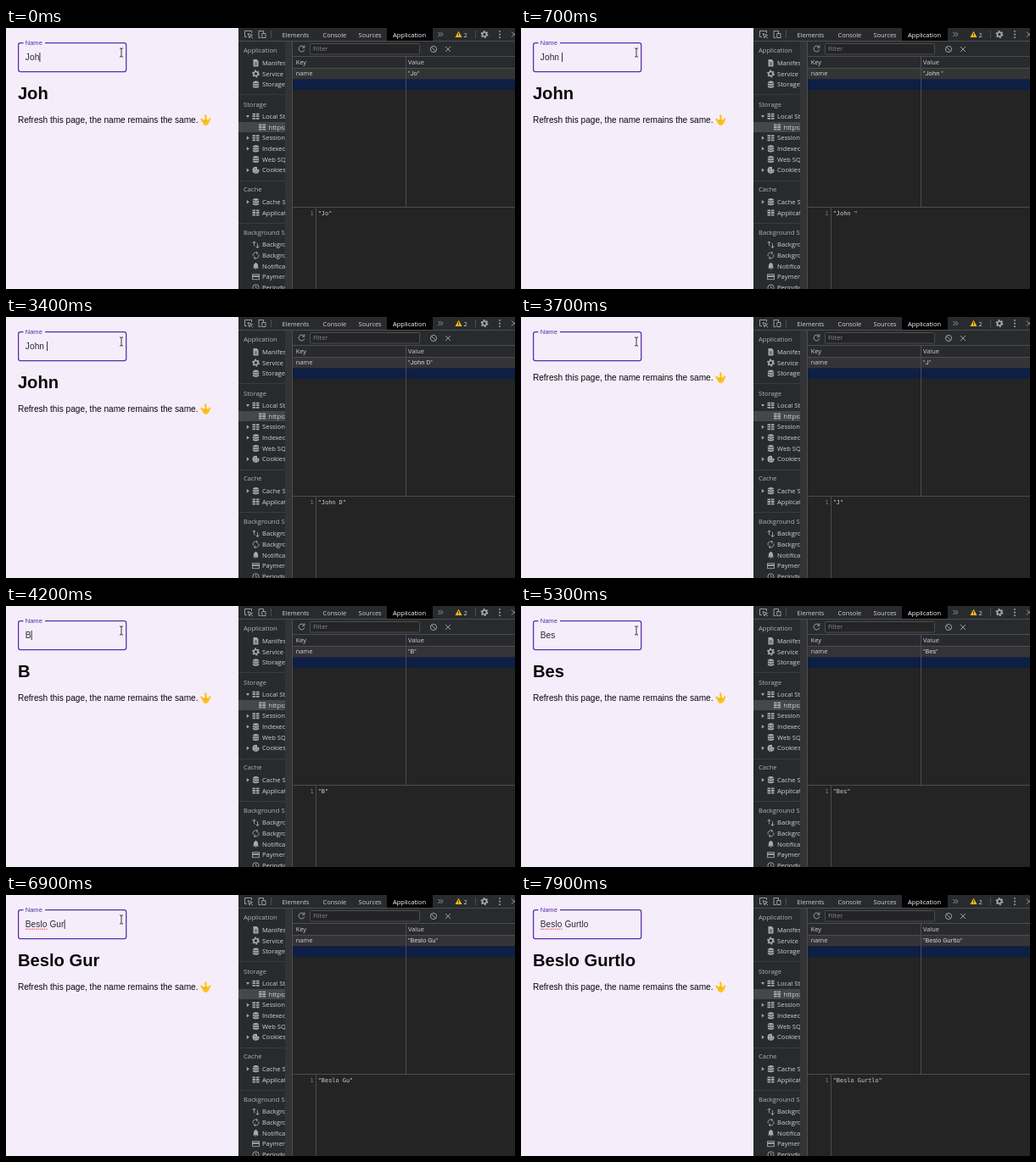
An HTML page for the animation above (8 s loop, 600 px wide and 308 px high).

```html
<!DOCTYPE html>
<html lang="en">
<head>
<meta charset="utf-8">
<title>Stored name demo</title>
<style>
  html, body { margin: 0; width: 100%; height: 100%; overflow: hidden; background: #f5edfa; }
  svg { display: block; }
  text { white-space: pre; }
  .page { font-family: "Liberation Sans", Arial, sans-serif; }
  .tools { font: 7.4px "Open Sans", "Noto Sans", sans-serif; fill: #d0d3d6; }
  .mono { font: 6.9px "DejaVu Sans Mono", monospace; }
  .value { font: 7.6px Roboto, sans-serif; }
  .line { fill: none; stroke: #a6aaae; stroke-width: .9; }
  .thick { stroke-width: 1.7; }
  .rule { fill: none; stroke: #4b4d50; stroke-width: 1; }
</style>
</head>
<body>
<svg width="600" height="308" viewBox="0 0 600 308">
  <defs><clipPath id="sideClip"><rect x="274" y="16" width="55" height="292"/></clipPath></defs>

  <g class="page">
    <rect width="275" height="308" fill="#f5edfa"/>
    <path d="M20.5 17.5H17Q14.6 17.5 14.6 19.9V49.2Q14.6 51.6 17 51.6H139.3Q141.7 51.6 141.7 49.2V19.9Q141.7 17.5 139.3 17.5H46"
      fill="none" stroke="#5a2ca8" stroke-width="1.25"/>
    <text x="22.7" y="19.7" font-size="7.57" fill="#5a2ca8">Name</text>
    <text id="field" x="22.8" y="38" font-size="10.1" letter-spacing=".095" fill="#2b292d"></text>
    <path id="misspelt" d="M23 40.2H48.5" stroke="#e04a4a" stroke-width="1" stroke-dasharray="1.6 .8"/>
    <rect id="caret" y="29" width=".9" height="11" fill="#222"/>
    <text id="heading" x="13.9" y="84" font-size="20.2" font-weight="bold" fill="#0a090b"></text>
    <g id="note">
      <text x="13.9" y="112.2" font-size="10.1" fill="#0a090b">Refresh this page, the name remains the same.</text>
      <g stroke="#fcc21b" stroke-width="2.2" stroke-linecap="round" fill="none">
        <path d="M232.6 110.8L230.4 107.6M235.8 109L235.2 103.3M238 112L240.2 107.4"/>
        <path d="M232.2 109.4Q235.5 107.4 238.2 109.6L237.6 113.2Q235 115.4 232.9 112.8Z" fill="#fcc21b" stroke-width="1.4"/>
      </g>
      <path d="M233 110.4Q235 109.1 237 110.6" fill="none" stroke="#e0a010" stroke-width=".6"/>
    </g>
    <path id="pointer" d="M-2 -5.2Q0 -5.2 0 -4Q0 -5.2 2 -5.2M0 -4.4V4.4M-2 5.2Q0 5.2 0 4Q0 5.2 2 5.2"
      fill="none" stroke="#2b292d" stroke-width=".9"/>
  </g>

  <g class="tools">
    <rect x="274" width="326" height="308" fill="#292a2d"/>
    <rect x="338" y="34" width="262" height="274" fill="#242424"/>
    <rect x="449" width="54" height="15" fill="#000"/>
    <path class="rule" d="M274 15.5H600M312.5 3V12"/>
    <path class="line" d="M284 10.5H281.5V3.5H289.5V6M285 6.5L290.5 8.5L288 9.3L287 11.8ZM288 9.3L291 12.2M300.5 11.5H298V3.5H303.5V6M301.8 6.5H306V11.5H301.8Z"/>
    <text x="325.5" y="10.5">Elements</text>
    <text x="373.5" y="10.5">Console</text>
    <text x="415.5" y="10.5">Sources</text>
    <text x="456" y="10.5" fill="#fff" font-size="7.5">Application</text>
    <path class="line" d="M509.5 5L512 7.5L509.5 10M512.5 5L515 7.5L512.5 10"/>
    <path d="M533.5 3.8L537.5 11H529.5Z" fill="#f5bd18"/>
    <path d="M533.5 6V8.6M533.5 9.4V10.2" stroke="#292a2d" stroke-width=".9"/>
    <text x="539.5" y="10.5">2</text>
    <path class="rule" d="M553.5 3V12"/>
    <g id="settings" transform="translate(564 7.5)"></g>
    <path d="M581.2 3.2h1.6v1.6h-1.6zM581.2 6.8h1.6v1.6h-1.6zM581.2 10.4h1.6v1.6h-1.6z" fill="#b0b4b8"/>
    <path class="line" d="M596 4.5L602 10.5M596 10.5L602 4.5"/>

    <g id="sidebar" clip-path="url(#sideClip)"></g>
    <rect x="329" y="16" width="8" height="292" fill="#333436"/>
    <path class="rule" d="M337.5 16V308"/>

    <path class="line" d="M351 22.2A3.4 3.4 0 1 0 351.8 25.5M351.8 20.5V23.2H349"/>
    <rect class="rule" x="358.5" y="18.5" width="129" height="12.5" rx="1" style="fill:#242424"/>
    <text x="362" y="27.2" fill="#85898d">Filter</text>
    <path class="line" d="M501.5 22.5L506.5 27.5M518 22L524 28M524 22L518 28"/>
    <circle class="line" cx="504" cy="25" r="3.6"/>

    <rect x="338" y="34" width="262" height="13" fill="#292a2d"/>
    <rect x="338" y="47.5" width="262" height="13" fill="#343436"/>
    <rect x="338" y="60.5" width="262" height="12.5" fill="#0e1e44"/>
    <path class="rule" d="M338 33.5H600M338 47.5H600M338 211.5H600M471.5 34V211M365.5 212V308"/>
    <text x="341.7" y="43.2">Key</text>
    <text x="474" y="43.2">Value</text>
    <text x="341.7" y="56">name</text>
    <text id="cell" class="value" x="474" y="56"></text>
    <text class="mono" x="358.5" y="221" fill="#7d8083">1</text>
    <text id="preview" class="mono" x="367.7" y="221"></text>
  </g>
</svg>

<script>
const LOOP = 8000;
const SECOND_NAME_AT = 3900;
const FIRST = "John Doe", SECOND = "Beslo Gurtlo";

// [time, letters in the field, letters stored]
const STEPS = [
  [0, 3, 2], [100, 3, 3], [300, 4, 4], [600, 5, 4], [700, 5, 5], [1000, 6, 5], [1100, 6, 6],
  [1300, 7, 6], [1400, 7, 7], [1600, 8, 7], [1700, 8, 8], [2800, 7, 8], [2900, 7, 7],
  [3100, 6, 6], [3400, 5, 6], [3500, 3, 5], [3600, 1, 3], [3700, 0, 1], [3800, 0, 0],
  [4100, 1, 0], [4200, 1, 1], [4400, 2, 1], [4500, 2, 2], [4700, 3, 3], [5400, 5, 4],
  [5500, 5, 5], [5800, 6, 5], [5900, 6, 6], [6100, 7, 7], [6300, 8, 7], [6400, 8, 8],
  [6900, 9, 8], [7000, 10, 9], [7100, 11, 10], [7200, 12, 11], [7300, 12, 12]
];
const CARET_OFF = [[2200, 2800], [3700, 4000], [5300, 5400], [7800, LOOP]];
const POINTER_MOVES_AT = 7800, POINTER_LEAVES_AT = 7900;

const el = id => document.getElementById(id);
const show = (id, on) => el(id).setAttribute("visibility", on ? "visible" : "hidden");

const stroke = d => `<path class="line" d="${d}"/>`;
const solid = d => `<path d="${d}" fill="#a6aaae"/>`;
const ICONS = {
  doc: solid("M-3-4.2H1L3-2.2V4.2H-3Z") + '<path d="M-1.5 0H1.5M-1.5 2H1.5" stroke="#292a2d" stroke-width=".8"/>',
  gear: '<circle class="line thick" r="2.5"/><circle class="line thick" r="3.6" stroke-dasharray="1.9 1.87"/>',
  db: solid("M-3.6-2.8Q0-5.4 3.6-2.8V3Q0 5.2-3.6 3Z") +
    '<path d="M-3.6-1.8Q0 0 3.6-1.8M-3.6 1Q0 2.8 3.6 1" fill="none" stroke="#292a2d" stroke-width=".8"/>',
  grid: [-3.5, -.9, 1.7].map(y => solid(`M-4 ${y}h3.6v1.8h-3.6zM.4 ${y}h3.6v1.8h-3.6z`)).join(""),
  cookie: '<circle r="4" fill="#a6aaae"/><path d="M-1.5-1.5h1v1h-1zM1 .8h1v1h-1zM-1.6 1.5h1v1h-1zM1.5-4h3v3h-3z" fill="#292a2d"/>',
  arrows: stroke("M-2 1.5V-3.8M-4-1.8L-2-3.8L0-1.8M2-1.5V3.8M0 1.8L2 3.8L4 1.8"),
  sync: stroke("M-3.3 1A3.4 3.4 0 0 1 2-2.8M3.3-1A3.4 3.4 0 0 1-2 2.8M.5-4.4L2.3-2.8L.5-1.2M-.5 4.4L-2.3 2.8L-.5 1.2"),
  bell: solid("M-3.6 2.6L-2.6 1.4V-1Q-2.4-3 0-4.2Q2.4-3 2.6-1V1.4L3.6 2.6ZM-1 3.2H1L0 4.3Z"),
  card: '<rect class="line" x="-3.9" y="-3" width="7.8" height="6"/>' + solid("M-4-1.6H4V.2H-4Z"),
  clock: '<circle class="line" r="3.6"/>' + stroke("M0-2V0L1.6 1")
};
const OPEN = "M283-1.2H287L285 1.8Z", CLOSED = "M283.8-2.2L286.8 0L283.8 2.2Z";

// [centre y, icon, label, arrow, indent]
const ROWS = [
  [41.2, "doc", "Manifest"], [54, "gear", "Service Workers"], [66.7, "db", "Storage"],
  [104.2, "grid", "Local Storage", OPEN], [117, "grid", "https://", "", 7.5],
  [129.7, "grid", "Session Storage", CLOSED], [142.4, "db", "IndexedDB", CLOSED],
  [155, "db", "Web SQL"], [167.7, "cookie", "Cookies", CLOSED],
  [205.2, "db", "Cache Storage", CLOSED], [218, "grid", "Application Cache"],
  [255.7, "arrows", "Background Fetch"], [268.4, "sync", "Background Sync"],
  [281, "bell", "Notifications"], [293.7, "card", "Payment Handler"], [306.4, "clock", "Periodic Sync"]
];
const SECTIONS = [[26.8, "Application"], [90, "Storage"], [190.8, "Cache"], [241.2, "Background Services"]];

function buildSidebar() {
  const rows = ROWS.map(([y, icon, label, arrow = "", indent = 0]) =>
    `<g transform="translate(0 ${y})">${arrow && solid(arrow)}
      <g transform="translate(${294.5 + indent} 0)">${ICONS[icon]}</g>
      <text x="${302 + indent}" y="2.6" font-size="7.6">${label}</text></g>`);
  const titles = SECTIONS.map(([y, label]) =>
    `<text x="280" y="${y + 2.6}" fill="#b0b4b8" font-size="7.6">${label}</text>`);
  const rules = [78.5, 180.5, 230.5].map(y => `<path d="M274 ${y}H330" stroke="#3a3b3e"/>`);
  el("sidebar").innerHTML =
    '<rect x="274" y="111" width="56" height="12" fill="#464749"/>' +
    [...rules, ...titles, ...rows].join("");
}

function render(time) {
  const [, typed, stored] = STEPS.findLast(step => step[0] <= time);
  const name = time < SECOND_NAME_AT ? FIRST : SECOND;
  const value = `"${name.slice(0, stored)}"`;
  const field = el("field");

  field.textContent = el("heading").textContent = name.slice(0, typed);
  el("cell").textContent = el("preview").textContent = value;
  el("note").setAttribute("transform", `translate(0 ${typed ? 0 : -37})`);

  el("caret").setAttribute("x", 22.9 + (typed ? field.getComputedTextLength() : 0));
  show("caret", !CARET_OFF.some(([from, to]) => time >= from && time < to));
  show("misspelt", time >= 5800);
  show("pointer", time < POINTER_LEAVES_AT);
  el("pointer").setAttribute("transform",
    time < POINTER_MOVES_AT ? "translate(136 29)" : "translate(171.5 108.5)");
}

buildSidebar();
el("settings").innerHTML = ICONS.gear;
const start = performance.now();
function tick() {
  render((performance.now() - start) % LOOP);
  requestAnimationFrame(tick);
}
tick();
</script>
</body>
</html>
```
